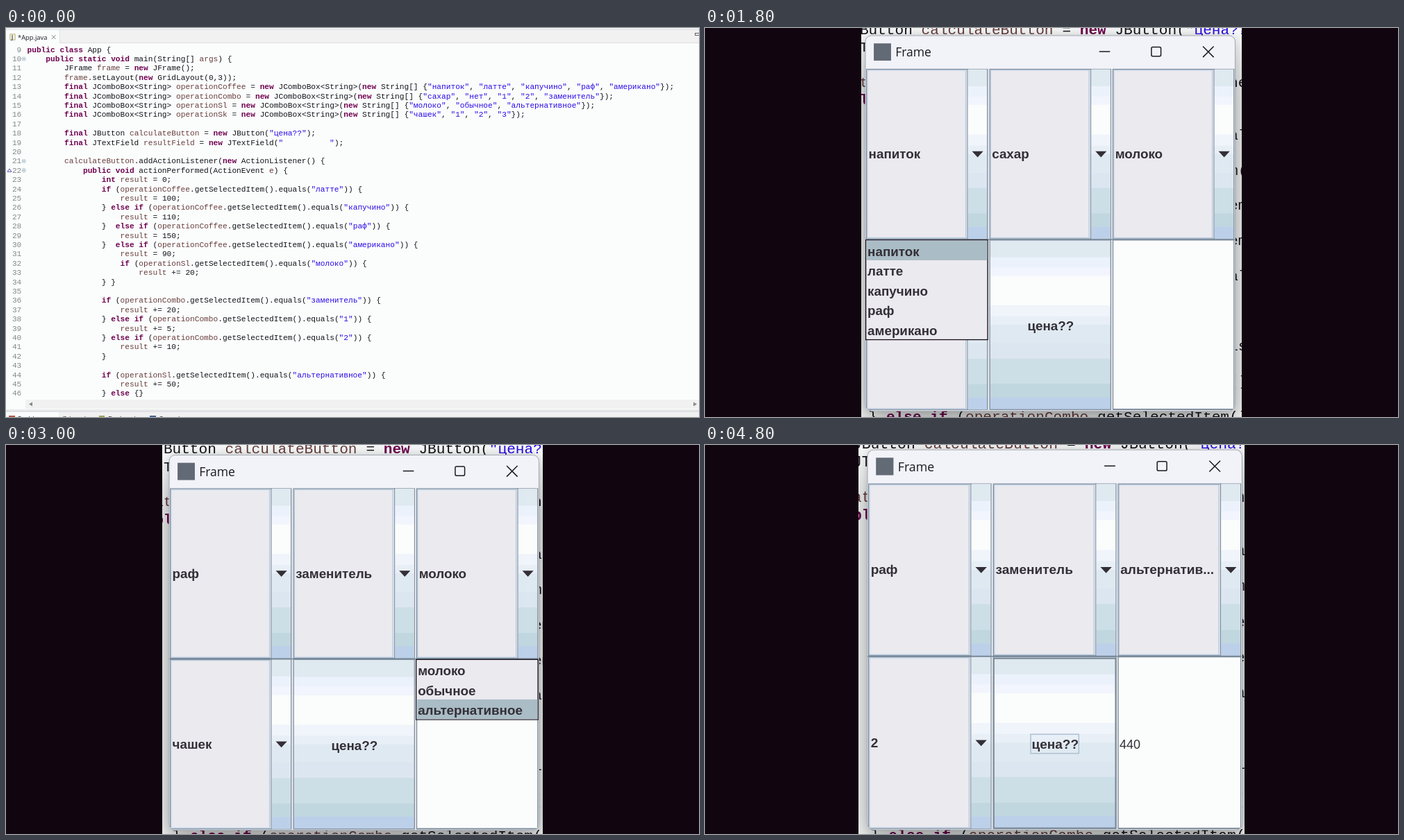
These frames come from a looping animation (998 px wide and 561 px high, 5.4 s). An HTML page with a canvas:

```html
<!DOCTYPE html>
<html lang="ru">
<head>
<meta charset="utf-8">
<style>
html, body { margin: 0; width: 998px; height: 561px; overflow: hidden; background: #110510; }
canvas { display: block; }
</style>
</head>
<body>
<canvas id="stage" width="998" height="561"></canvas>
<script>
const c = document.getElementById('stage').getContext('2d');
const STEP = 600;
const WHITE = '#fafdfc', PANEL = '#f1f1f1', EDGE = '#d4d4de', DARK = '#110510', STEEL = '#7a8a99';
const UI = '"Open Sans", sans-serif', MONO = '"Liberation Mono", monospace', SWING = '"Liberation Sans", Arial, sans-serif';

const rect = (x, y, w, h, fill) => { c.fillStyle = fill; c.fillRect(x, y, w, h); };
const frame = (x, y, w, h, color, width = 1) => {
  c.strokeStyle = color; c.lineWidth = width; c.strokeRect(x, y, w, h);
};
const text = (str, x, y, font, fill, align = 'left') => {
  c.font = font; c.fillStyle = fill; c.textAlign = align; c.fillText(str, x, y);
};
const poly = (points, fill) => {
  c.beginPath(); points.forEach(p => c.lineTo(...p)); c.closePath();
  c.fillStyle = fill; c.fill();
};
const circle = (x, y, r, fill) => {
  c.beginPath(); c.arc(x, y, r, 0, 7); c.fillStyle = fill; c.fill();
};
const lines = (color, width, ...segments) => {
  c.strokeStyle = color; c.lineWidth = width; c.beginPath();
  for (const [x1, y1, x2, y2] of segments) { c.moveTo(x1, y1); c.lineTo(x2, y2); }
  c.stroke();
};
const box = (x, y, w, h, r, fill) => {
  c.beginPath(); c.roundRect(x, y, w, h, r); c.fillStyle = fill; c.fill();
};
const shadow = (color, blur, dx, dy) => {
  c.shadowColor = color; c.shadowBlur = blur; c.shadowOffsetX = dx; c.shadowOffsetY = dy;
};
const downArrow = (x, y, w, h, fill) =>
  poly([[x - w / 2, y - h / 2], [x + w / 2, y - h / 2], [x, y + h / 2]], fill);

// ---- Code editor ----
const FIRST_LINE = 9, CHAR = 6.703, LINE = 13.405, CODE_X = 30.5;
const CODE = `public class App {
    public static void main(String[] args) {
        JFrame frame = new JFrame();
        frame.setLayout(new GridLayout(0,3));
        final JComboBox<String> operationCoffee = new JComboBox<String>(new String[] {"напиток", "латте", "капучино", "раф", "американо"});
        final JComboBox<String> operationCombo = new JComboBox<String>(new String[] {"сахар", "нет", "1", "2", "заменитель"});
        final JComboBox<String> operationSl = new JComboBox<String>(new String[] {"молоко", "обычное", "альтернативное"});
        final JComboBox<String> operationSk = new JComboBox<String>(new String[] {"чашек", "1", "2", "3"});

        final JButton calculateButton = new JButton("цена??");
        final JTextField resultField = new JTextField("          ");

        calculateButton.addActionListener(new ActionListener() {
            public void actionPerformed(ActionEvent e) {
                int result = 0;
                if (operationCoffee.getSelectedItem().equals("латте")) {
                    result = 100;
                } else if (operationCoffee.getSelectedItem().equals("капучино")) {
                    result = 110;
                }  else if (operationCoffee.getSelectedItem().equals("раф")) {
                    result = 150;
                }  else if (operationCoffee.getSelectedItem().equals("американо")) {
                    result = 90;
                    if (operationSl.getSelectedItem().equals("молоко")) {
                        result += 20;
                } }

                if (operationCombo.getSelectedItem().equals("заменитель")) {
                    result += 20;
                } else if (operationCombo.getSelectedItem().equals("1")) {
                    result += 5;
                } else if (operationCombo.getSelectedItem().equals("2")) {
                    result += 10;
                }

                if (operationSl.getSelectedItem().equals("альтернативное")) {
                    result += 50;
                } else {}`.split('\n');
const KEYWORD = /^(public|class|static|void|new|final|int|if|else)$/;
const VARIABLE = /^(args|frame|result\w*|operation\w*|calculateButton|e)$/;

function drawCode() {
  CODE.forEach((line, i) => {
    const number = FIRST_LINE + i, y = 34.5 + i * LINE;
    text(number, 22.3, y, `11.17px ${MONO}`, '#85898d', 'right');
    for (const { 0: token, index } of line.matchAll(/"[^"]*"|\w+|[^\w\s"]+/g)) {
      const bold = KEYWORD.test(token);
      const color = bold ? '#70004f' : token[0] === '"' ? '#2a0be8' : VARIABLE.test(token) ? '#6a3e3e' : '#15131a';
      text(token, CODE_X + index * CHAR, y, `${bold ? 'bold ' : ''}11.17px ${MONO}`, color);
    }
    if ([10, 21, 22].includes(number)) {
      circle(25.7, y - 3.5, 2.9, '#a9bac6');
      circle(25.7, y - 3.5, 2.3, '#e6eef4');
      lines('#60788c', .6, [24.2, y - 3.5, 27.2, y - 3.5]);
    }
  });
  c.beginPath(); c.moveTo(2, 207.3); c.lineTo(5, 203); c.lineTo(8, 207.3); c.closePath();
  c.strokeStyle = '#5a50b8'; c.lineWidth = 1; c.stroke();
}

function pageIcon(x, y, color) {
  rect(x, y, 8, 9, '#b59a58');
  rect(x + .8, y + .8, 6.4, 7.4, '#fbf6dc');
  text('J', x + 2.2, y + 7.4, `bold 8px ${UI}`, color);
}

function drawEditor() {
  rect(0, 0, 998, 561, WHITE);
  rect(0, 0, 998, 22, PANEL);
  rect(0, 2.2, 998, .6, EDGE);
  rect(77, 21.4, 921, .6, EDGE);
  rect(0, 2.8, 77, 20, WHITE);
  rect(77, 2.8, .6, 19, EDGE);
  pageIcon(5.5, 8.5, '#3c5a96');
  text('*App.java', 17, 16.6, `9.35px ${UI}`, '#1b1a22');
  lines('#22202a', .55, [65.8, 10.2, 71.6, 16], [71.6, 10.2, 65.8, 16]);
  frame(992.5, 7.5, 8, 3, '#5c6068');
  drawCode();

  rect(28, 536, 970, 13, PANEL);
  poly([[33, 542.5], [38, 539.5], [38, 545.5]], '#85898c');
  poly([[995, 542.5], [990, 539.5], [990, 545.5]], '#85898c');
  rect(0, 550, 998, 3, '#e9eaea');
  rect(0, 553, 998, 8, PANEL);
  rect(0, 552.5, 998, 1, EDGE);
  rect(0, 554, 76, 7, WHITE);
  rect(4, 559, 9, 2, '#b5574d');
  rect(134, 559, 8, 2, '#a5a057');
  rect(207, 559, 9, 2, '#47648e');
  [['Problems', 17], ['@ Javadoc', 80], ['Declaration', 147], ['Console', 220]]
    .forEach(([label, x]) => text(label, x, 566.5, `9.6px ${UI}`, '#25242c'));
}

// ---- Enlarged toolbar ----
const sparkle = (x, y) => {
  poly([[x, y - 12], [x + 4, y - 4], [x + 12, y], [x + 4, y + 4], [x, y + 12], [x - 4, y + 4], [x - 12, y], [x - 4, y - 4]], '#c79a42');
  circle(x, y, 4, '#fff3c4');
};
const runBadge = (x, y, r) => {
  circle(x, y, r, '#2f7a45');
  circle(x, y, r * .85, '#4c9b58');
  poly([[x - r * .3, y - r * .55], [x + r * .6, y], [x - r * .3, y + r * .55]], '#fbfffb');
};
const folder = x => {
  poly([[x - 25, 182], [x - 8, 182], [x - 4, 187], [x + 19, 187], [x + 19, 212], [x - 25, 212]], '#b98a42');
  poly([[x - 22, 185], [x - 9, 185], [x - 5, 190], [x + 16, 190], [x + 16, 209], [x - 22, 209]], '#f6deA0');
};
const folderFlap = x => {
  poly([[x - 25, 213], [x - 15, 193], [x + 27, 193], [x + 18, 213]], '#b98a42');
  poly([[x - 20, 210], [x - 13, 196], [x + 22, 196], [x + 16, 210]], '#f8dd98');
};
const dots = x => { for (let y = 169; y < 213; y += 9) rect(x - 2, y, 5, 5, '#d3c8bd'); };

function drawBug(x, y) {
  lines('#3c7480', 3, [x - 21, y - 13, x + 20, y + 14], [x + 18, y - 18, x - 16, y + 19],
    [x - 23, y + 3, x + 23, y - 1], [x - 8, y - 21, x + 8, y + 22]);
  c.beginPath(); c.ellipse(x, y + 1, 12, 17, -.6, 0, 7);
  c.fillStyle = '#347383'; c.fill();
  c.beginPath(); c.ellipse(x, y + 1, 9, 14, -.6, 0, 7);
  c.fillStyle = '#9dcbc4'; c.fill();
}

function drawRocket(x, y) {
  c.save(); c.translate(x, y); c.rotate(.82);
  poly([[-9, 8], [-19, 20], [-11, 27], [11, 27], [19, 20], [9, 8]], '#8b7a70');
  poly([[-8, 22], [8, 22], [0, 36]], '#e5a647');
  c.beginPath(); c.ellipse(0, -5, 12, 28, 0, 0, 7); c.fillStyle = '#a98a6c'; c.fill();
  c.beginPath(); c.ellipse(0, -5, 9, 25, 0, 0, 7); c.fillStyle = '#ecd6b4'; c.fill();
  circle(0, -10, 5, '#66809f');
  c.restore();
}

function drawToolbar() {
  c.save();
  c.beginPath(); c.rect(0, 24, 998, 513); c.clip();
  c.save(); c.translate(-72.8, 226.7); c.scale(4.88, 4.88); drawEditor(); c.restore();

  rect(0, 0, 998, 62, '#f3f2f8');
  const title = `43px ${UI}`, menu = `46.2px ${UI}`;
  text('b_2/App.java', 258, 34, title, '#1b1a22', 'right');
  text('-', 276, 34, title, '#1b1a22');
  text('Brellow IDE', 308, 34, title, '#1b1a22');
  rect(0, 62, 998, 76, WHITE);
  text('Navigate', 150, 121, menu, '#1b1a22', 'right');
  [['Search', 207.5], ['Project', 411], ['Run', 619.5], ['Window', 762]]
    .forEach(([label, x]) => text(label, x, 121, menu, '#1b1a22'));
  rect(0, 138, 998, 100, PANEL);
  rect(0, 236.5, 998, 3, EDGE);

  rect(-20, 174, 45, 36, '#8a5a3a');
  for (const x of [-7, 10]) for (const y of [179, 196]) rect(x, y, 12, 11, '#d4a878');
  sparkle(20, 180);
  circle(87, 191, 22, '#2f7d4c');
  circle(87, 191, 18, '#4a9a62');
  text('C', 86, 204, `bold 35px ${UI}`, '#fbfffb', 'center');
  sparkle(98, 179);
  dots(189); dots(755);
  drawBug(240, 190);
  rect(338, 156, 135, 65, '#dde7f1');
  frame(338, 156, 135, 65, '#b8d0e4', 2);
  lines('#b8d0e4', 2, [411, 156, 411, 221]);
  runBadge(376, 190, 23.5);
  runBadge(506, 183, 19);
  rect(503, 193, 34, 16, DARK);
  rect(520, 196, 14, 10, '#82401f');
  runBadge(643, 183, 19);
  rect(655, 187, 16, 8, '#9b4638');
  rect(648, 192, 29, 20, '#b4503e');
  rect(648, 200, 29, 3, '#e3a08c');
  for (const x of [152, 307, 444, 581, 718]) downArrow(x, 191, 29, 15, DARK);
  folder(801);
  circle(799, 179, 12, '#6252a0'); circle(815, 185, 11, '#4a9a62');
  folderFlap(801);
  folder(875);
  rect(869, 173, 23, 21, '#7d9cbb'); rect(872, 176, 17, 18, '#e3eef7');
  folderFlap(875);
  drawRocket(955, 191);

  shadow('rgba(60,60,70,.65)', 8, 8, 7);
  box(352, 240, 297, 77, 9, WHITE);
  shadow('transparent', 0, 0, 0);
  c.strokeStyle = '#d8dadc'; c.lineWidth = 2; c.stroke();
  text('Run App (1)', 368, 295, `47.8px ${UI}`, '#585a66');
  c.restore();
}

// ---- Swing window ----
const COLS = [288, 430.8, 573.4], ROWS = [65.5, 263.5], CELL_W = 141, CELL_H = 197.5;
const INK = '#332f36', FIELD = '#eaeaef', SWING_BOLD = `bold 15.1px ${SWING}`;
const BANDS = [[0, '#dfe9f0'], [.1, '#ecf2fc'], [.16, '#f2f5fd'], [.21, WHITE], [.385, '#f0f4fb'],
  [.45, '#e8eff7'], [.5, '#dfe9f1'], [.61, '#dce6f1'], [.7, '#cddfe6'], [.85, '#c1d7e0'], [.93, '#bcd0ea'], [1]];

function bands(x, y, w, h) {
  BANDS.slice(0, -1).forEach(([at, color], i) => {
    rect(x, y + at * h, w, (BANDS[i + 1][0] - at) * h + (i < 10 ? .5 : 0), color);
  });
}

function drawCombo(col, row, value) {
  const x = COLS[col], y = ROWS[row], mid = y + CELL_H / 2;
  rect(x, y, CELL_W, CELL_H, STEEL);
  rect(x + 1, y + 1, CELL_W - 2, CELL_H - 2, FIELD);
  frame(x + 1.5, y + 1.5, 114, CELL_H - 3, '#b4c8df');
  rect(x + 117, y, 1, CELL_H, STEEL);
  bands(x + 118, y + .5, 22, CELL_H - 1);
  downArrow(x + 129.2, mid + .3, 13, 7, INK);
  text(value, x + 3, mid + 5.2, SWING_BOLD, INK);
}

function drawPriceButton(focused) {
  const x = COLS[1], y = ROWS[1];
  rect(x, y, CELL_W, CELL_H, STEEL);
  bands(x + 1, y + 1, CELL_W - 2, CELL_H - 2);
  if (focused) {
    frame(x + .8, y + 2.2, CELL_W - 1.6, CELL_H - 3.2, STEEL, 1.6);
    frame(x + 43, y + 89, 55, 22, '#a3b8cc');
  }
  text('цена??', x + 71, y + 105.5, SWING_BOLD, INK, 'center');
}

function drawPopup([col, row, items, selected]) {
  const x = COLS[col] - .7, y = row ? 463 : 263.5, width = 142, pitch = 22.9;
  rect(x, y, width, items.length * pitch + 2, DARK);
  rect(x + 1, y + 1, width - 2, items.length * pitch, FIELD);
  items.forEach((item, i) => {
    const top = y + 1 + i * pitch;
    if (i === selected) rect(x + 1, top, width - 2, pitch, '#aabcc5');
    text(item, x + 2.5, top + 18, SWING_BOLD, INK);
  });
}

function drawWindow({ x, y, s, crop, values, popup, price }) {
  c.save();
  c.beginPath(); c.rect(crop[0], 0, crop[1] - crop[0], 561); c.clip();
  c.translate(x - 287.3 * s, y - 27 * s);
  c.scale(s, s);
  c.save(); c.translate(81.6, -210.5); c.scale(1.52, 1.52); drawEditor(); c.restore();

  shadow('rgba(0,0,0,.32)', 50 * s, 0, 22 * s);
  box(287.3, 27, 428, 435, 7, '#f2f2f9');
  shadow('rgba(0,0,0,.2)', 12 * s, 0, 2 * s);
  c.fill();
  shadow('transparent', 0, 0, 0);
  c.strokeStyle = '#a4a9b0'; c.lineWidth = .8; c.stroke();

  rect(297, 36, 20, 20, '#626a76');
  text('Frame', 322, 51.5, `14.1px ${UI}`, '#1b1a22');
  lines('#1b1a22', 1.2, [558, 45.5, 570.5, 45.5], [678, 39.5, 690.5, 52], [690.5, 39.5, 678, 52]);
  c.beginPath(); c.roundRect(618.4, 40.3, 11, 10.6, 1.5); c.stroke();

  c.save();
  c.beginPath(); c.roundRect(287.5, 65, 427.5, 396.5, [0, 0, 6, 6]); c.clip();
  rect(287.5, 65, 427.5, 396.5, FIELD);
  values.forEach((value, i) => drawCombo(i % 3, i < 3 ? 0 : 1, value));
  drawPriceButton(price);
  rect(COLS[2], ROWS[1], CELL_W, CELL_H, STEEL);
  rect(COLS[2] + 1, ROWS[1] + 1, CELL_W - 2, CELL_H - 2.5, WHITE);
  if (price) text(price, COLS[2] + 2, ROWS[1] + 105.3, `14.3px ${SWING}`, INK);
  rect(287, 262.7, 428, 1.3, STEEL);
  c.restore();
  if (popup) drawPopup(popup);
  c.restore();
}

// ---- Timeline ----
const DRINKS = ['напиток', 'латте', 'капучино', 'раф', 'американо'];
const SUGAR = ['сахар', 'нет', '1', '2', 'заменитель'];
const MILK = ['молоко', 'обычное', 'альтернативное'];
const CUPS = ['чашек', '1', '2', '3'];
const SHORT_MILK = 'альтернатив...';
const start = { x: 231, y: 11, s: 1.244, crop: [225, 773], values: ['напиток', 'сахар', 'молоко', 'чашек'] };
const scenes = [
  drawEditor,
  drawToolbar,
  () => drawWindow(start),
  () => drawWindow({ ...start, popup: [0, 0, DRINKS, 0] }),
  () => drawWindow({ x: 232, y: 11, s: 1.25, crop: [223, 775], values: ['раф', 'сахар', 'молоко', 'чашек'], popup: [1, 0, SUGAR, 4] }),
  () => drawWindow({ x: 235, y: 14.5, s: 1.244, crop: [225, 773], values: ['раф', 'заменитель', 'молоко', 'чашек'], popup: [2, 0, MILK, 2] }),
  () => drawWindow({ x: 287.3, y: 27, s: 1, crop: [266, 732], values: ['раф', 'заменитель', SHORT_MILK, 'чашек'], popup: [0, 1, CUPS, 2] }),
  () => drawWindow({ x: 239, y: 13, s: 1.22, crop: [230, 768], values: ['раф', 'заменитель', SHORT_MILK, '2'] }),
  () => drawWindow({ x: 234, y: 7, s: 1.26, crop: [221, 777], values: ['раф', 'заменитель', SHORT_MILK, '2'], price: '440' })
];

let shown = -1;
function tick() {
  const index = Math.floor(performance.now() / STEP) % scenes.length;
  if (index !== shown) {
    shown = index;
    rect(0, 0, 998, 561, DARK);
    scenes[index]();
  }
  requestAnimationFrame(tick);
}
tick();
</script>
</body>
</html>
```
